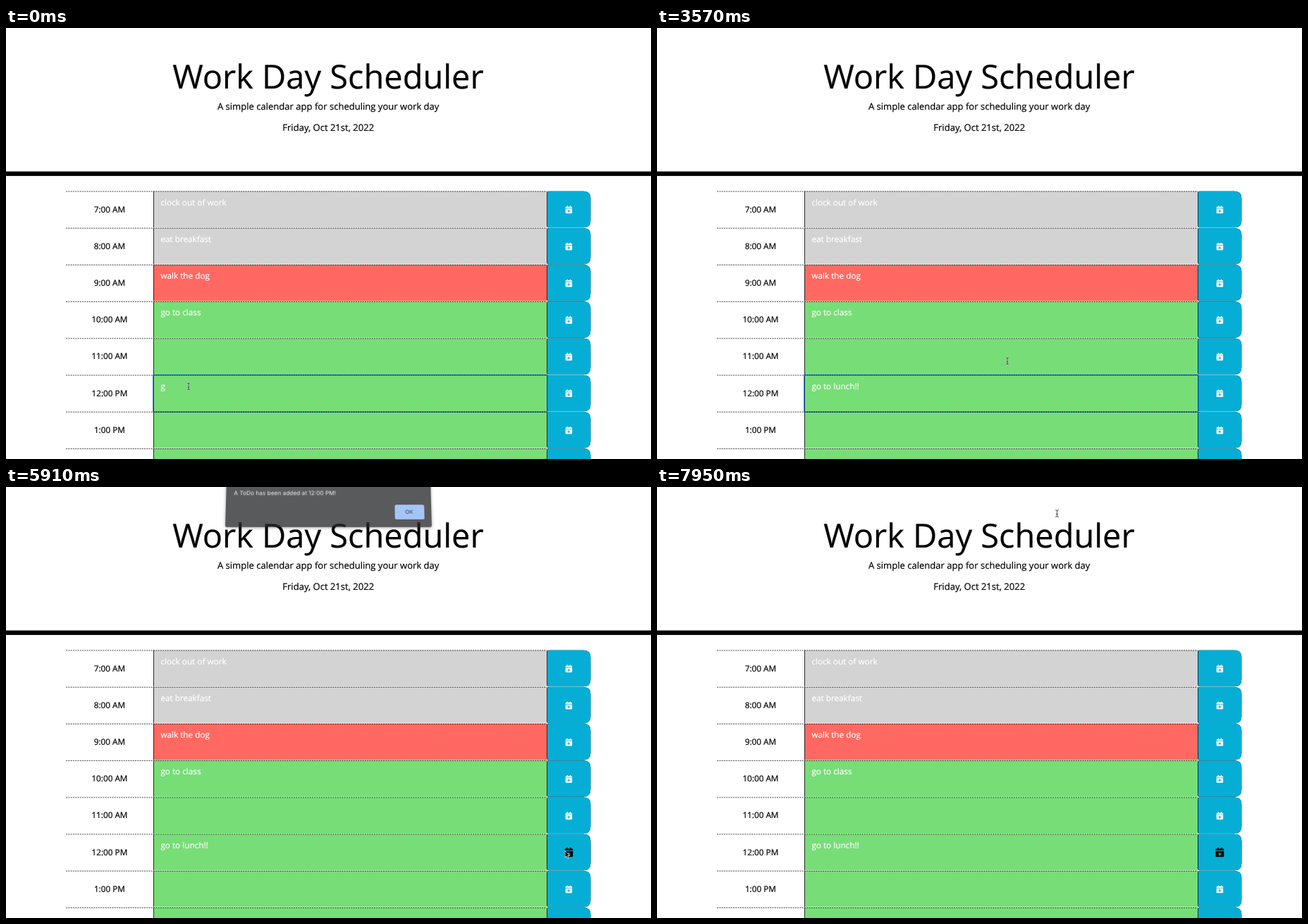
Recreate the animation shown at these times as an HTML page. Size 915 by 612 pixels, loop 8 s.

```html
<!DOCTYPE html>
<html lang="en">
<head>
<meta charset="utf-8">
<title>Work Day Scheduler</title>
<style>
  html, body { margin: 0; width: 100%; height: 100%; overflow: hidden; background: #fff; }
  body { position: relative; }
  svg { position: absolute; left: 0; top: 0; display: block; }
  text { font-family: "Open Sans", sans-serif; white-space: pre; text-rendering: geometricPrecision;
    fill: #000; stroke: #000; stroke-width: .2; }
  .note { fill: #fff; stroke: #fff; }
  #dialog {
    position: absolute; left: 310.5px; top: -30px; width: 293px; height: 89.7px;
    background: #292a2d; border-radius: 3px; transform-origin: 50% 100%;
    box-shadow: 0 1px 4px rgba(0, 0, 0, .45), 0 0 1px rgba(0, 0, 0, .5);
    font-family: Inter, sans-serif; text-rendering: geometricPrecision;
  }
  #dialog span { position: absolute; white-space: nowrap; }
  #msg { left: 11px; top: 35.5px; font-size: 8.4px; line-height: 12px; color: #e8eaed; }
  #ok {
    left: 240.5px; top: 58px; width: 42px; height: 21px; border-radius: 2.6px;
    background: #8ab4f8; color: #202124; font-size: 7.8px; font-weight: 500;
    line-height: 21px; text-align: center;
  }
</style>
</head>
<body>
<svg id="page" width="915" height="612" viewBox="0 0 915 612">
  <defs>
    <path id="plan" fill-rule="evenodd" d="M0 160V112Q0 64 48 64H96V12Q96 0 108 0H148Q160 0 160 12V64H288V12Q288 0 300 0H340Q352 0 352 12V64H400Q448 64 448 112V160ZM0 192H448V464Q448 512 400 512H48Q0 512 0 464ZM200 256V328H128V376H200V448H248V376H320V328H248V256Z"/>
  </defs>
  <g text-anchor="middle">
    <text x="456.9" y="86.1" font-size="46.98">Work Day Scheduler</text>
    <text x="457.2" y="116" font-size="13.05">A simple calendar app for scheduling your work day</text>
    <text x="457.2" y="146" font-size="13.05">Friday, Oct 21st, 2022</text>
  </g>
  <rect y="203.7" width="915" height="6.4"/>
  <g id="rows"></g>
</svg>
<div id="dialog"><span id="msg">A ToDo has been added at 12:00 PM!</span><span id="ok">OK</span></div>
<svg id="top" width="915" height="612" viewBox="0 0 915 612">
  <g id="beam" fill="none" stroke-linecap="round">
    <path stroke="#fff" stroke-opacity=".6" stroke-width="1.8" d="M-2-5Q0-5 0-3.6Q0-5 2-5M0-4V4M-2 5Q0 5 0 3.6Q0 5 2 5M-1 1H1"/>
    <path stroke="#111" stroke-width=".7" d="M-2-5Q0-5 0-3.6Q0-5 2-5M0-4V4M-2 5Q0 5 0 3.6Q0 5 2 5M-1 1H1"/>
  </g>
  <path id="arrow" fill="#000" stroke="#fff" stroke-width=".8" stroke-linejoin="round" d="M0 0V9.6L2.2 7.6L3.8 11.2L5.4 10.5L3.9 7H6.9Z"/>
  <path id="hand" fill="#fff" stroke="#000" stroke-width=".7" stroke-linejoin="round" d="M-1 6V.8Q0-.6 1 .8V4.2Q2.4 3.6 2.8 4.6Q4.2 4 4.6 5Q6 4.7 6 6V8.2Q5.6 9.8 4.8 11.4H-.6Q-1.8 9.2-3.6 7.2Q-3.6 5.6-2 6.2L-1 7.2Z"/>
</svg>
<script>
const LOOP = 8000, STEP = 60, PITCH = 52.2, FS = 11.745;
const $ = id => document.getElementById(id);
const GRAY = '#d3d3d3', RED = '#ff6961', GREEN = '#77dd77', BLUE = '#06aed5';
const ACTIVE = 5;

const plans = [
  ['7:00 AM', GRAY, 'clock out of work'], ['8:00 AM', GRAY, 'eat breakfast'],
  ['9:00 AM', RED, 'walk the dog'], ['10:00 AM', GREEN, 'go to class'],
  ['11:00 AM', GREEN, ''], ['12:00 PM', GREEN, ''],
  ['1:00 PM', GREEN, ''], ['2:00 PM', GREEN, '']
];

function rowMarkup([hour, color, note], i) {
  const y = 231.7 + PITCH * i, h = 51.5;
  const id = name => i === ACTIVE ? `id="${name}"` : '';
  const button = x => `M${x + 2.6} ${y}H819.3q10 0 10 10v${h - 20}q0 10-10 10H${x + 2.6}q-2.6 0-2.6-2.6V${y + 2.6}q0-2.6 2.6-2.6z`;
  return `<rect x="209.2" y="${y}" width="558.1" height="${h}" fill="${color}"/>
    <path d="M209.5 ${y}v${h}" stroke="#000" stroke-width=".8"/>
    <path d="M85.2 ${y + .35}H767.3" stroke="#000" stroke-width=".75" stroke-dasharray="1.96 1.3"/>
    <text x="146.9" y="${y + 29.9}" font-size="${FS}" text-anchor="middle">${hour}</text>
    <text ${id('note')} class="note" x="219.4" y="${y + 20}" font-size="${FS}">${note}</text>
    <g ${id('button')}><path d="${button(767.2)}"/><path fill="${BLUE}" d="${button(768)}"/></g>
    <use ${id('icon')} href="#plan" fill="#fff" transform="${iconAt(y + 26.2, .0212)}"/>`;
}
function iconAt(y, s) {
  return `translate(798.4 ${y}) scale(${s}) translate(-224 -256)`;
}

const rowY = 231.7 + PITCH * ACTIVE;
$('rows').innerHTML = plans.map(rowMarkup).join('') +
  `<rect id="focus" x="208.9" y="${rowY}" width="558.9" height="52.4" rx=".6" fill="none" stroke="#0a57b8" stroke-width="1.3"/>
   <path id="under" d="M209 ${rowY + PITCH + .35}H767.3" stroke="#000" stroke-width=".75" stroke-dasharray="1.96 1.3"/>
   <rect id="caret" y="${rowY + 7.8}" width=".7" height="16" fill="#fff"/>`;

const note = $('note');
const phrase = 'go to lunch!!';
const keys = [-600, 60, 360, 530, 710, 820, 1060, 1300, 1420, 1600, 1710, 2610, 2850];
const CLICK = 5730, HOVER = 5070, CLOSED = 7950;

// pointer stops: time, x, y
const path = [
  [0, 259, 509], [3300, 259, 509], [3570, 497, 473], [3750, 497, 473],
  [3990, 675, 479], [4170, 675, 479], [4710, 761.5, 508.7], [5010, 794, 518],
  [5370, 793, 516.5], [6510, 793, 516.5], [6750, 621, 96], [6930, 621, 96],
  [6990, 603.8, 83.5], [7410, 567.5, 37.6], [LOOP, 567.5, 37.6]
];

function pointer(t) {
  let i = 1;
  while (i < path.length - 1 && path[i][0] < t) i++;
  const [t0, x0, y0] = path[i - 1], [t1, x1, y1] = path[i];
  const k = (t - t0) / (t1 - t0);
  return [x0 + (x1 - x0) * k, y0 + (y1 - y0) * k];
}

function show(el, on) { el.style.display = on ? '' : 'none'; }

function draw(t) {
  const q = Math.max(0, Math.floor((t - 30) / STEP) * STEP + 30);
  const typed = keys.filter(k => k <= t);
  const focused = t < CLICK;

  note.textContent = phrase.slice(0, typed.length);
  const idle = q - typed[typed.length - 1];
  show($('caret'), focused && (idle < 0 || Math.floor(idle / 500) % 2 === 0));
  $('caret').setAttribute('x', 219.4 + note.getComputedTextLength());
  show($('focus'), focused);
  show($('under'), focused);

  const hover = t >= HOVER;
  $('icon').setAttribute('fill', hover ? '#000' : '#fff');
  $('icon').setAttribute('transform', iconAt(rowY + 25.9, hover ? .0262 : .0212));
  $('button').style.filter = focused ? '' : 'drop-shadow(.5px .6px .7px rgba(0,0,0,.4))';

  let alpha = 0;
  if (t >= CLICK && t < CLOSED)
    alpha = Math.min(1, (q - 5700) / 270, 1 - (q - 7690) / 350);
  const tilt = (1 - alpha) / .44;
  const dialog = $('dialog');
  show(dialog, alpha > 0);
  dialog.style.opacity = alpha;
  dialog.style.transform = tilt > 0
    ? `translateY(${-6.2 * tilt}px) perspective(400px) rotateX(${9 * tilt}deg)` : 'none';

  const [x, y] = pointer(q);
  const overButton = focused && x > 768;
  const arrow = t >= CLICK && t < CLOSED;
  const kind = arrow ? 'arrow' : overButton ? 'hand' : 'beam';
  for (const id of ['beam', 'arrow', 'hand']) {
    show($(id), id === kind);
    $(id).setAttribute('transform', `translate(${x} ${y})`);
  }
}

const start = performance.now();
function tick() {
  draw((performance.now() - start) % LOOP);
  requestAnimationFrame(tick);
}
tick();
</script>
</body>
</html>
```
